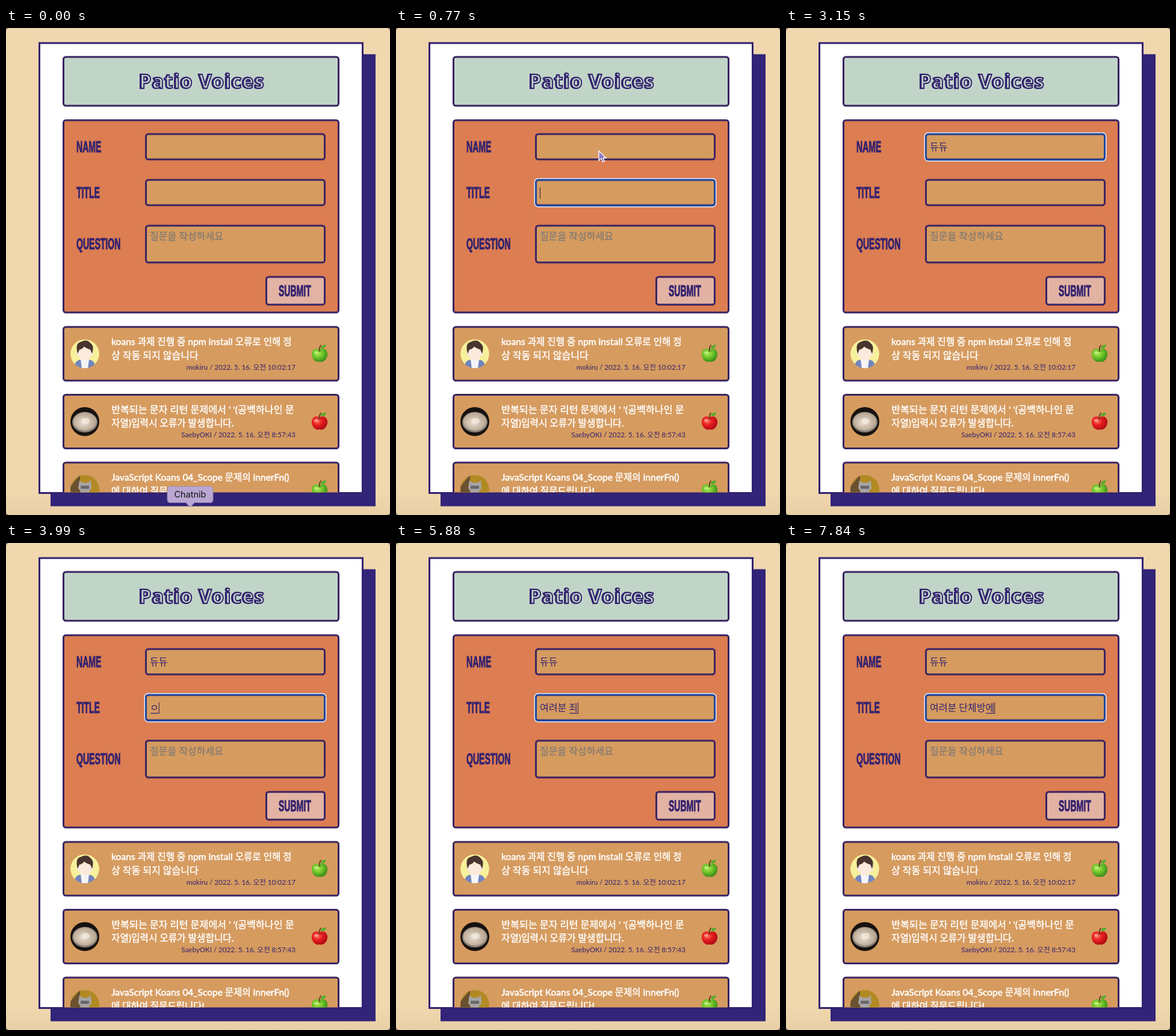
Animation, 638 px wide and 808 px high, one loop 8 s. Source, as an HTML page:

```html
<!DOCTYPE html>
<html lang="ko">
<head>
<meta charset="utf-8">
<title>Question board</title>
<style>
  html, body { margin: 0; height: 100%; overflow: hidden; background: #f0d7ae; }
  svg { display: block; width: 100%; height: 100%; }
  text { font-family: Lato, "Noto Sans CJK KR", "Noto Sans CJK", sans-serif; white-space: pre; fill: #33226f; }
  .box { stroke: #3a2462; stroke-width: 3; }
  .label { font: bold 26px "Liberation Sans", sans-serif; stroke: #33226f; stroke-width: 1; }
  .heading { font: bold 32px "Noto Sans", sans-serif; letter-spacing: 1.4px; text-anchor: middle; }
  .question { font-weight: 500; fill: #fff; stroke: #fff; stroke-width: .45; }
  .author { font-size: 11.6px; text-anchor: end; }
  .typed { font-size: 16px; }
  .placeholder { font-size: 16px; fill: #7e7973; stroke: #7e7973; stroke-width: .25; }
</style>
</head>
<body>
<svg viewBox="0 0 638 808">
  <defs>
    <clipPath id="page"><rect x="57" y="27" width="534" height="744"/></clipPath>
    <clipPath id="disc"><circle r="24"/></clipPath>
    <linearGradient id="edge" x2="0" y2="1">
      <stop stop-color="#9a7c50" stop-opacity="0"/><stop offset="1" stop-color="#9a7c50" stop-opacity=".09"/>
    </linearGradient>
    <radialGradient id="greenSkin" cx=".38" cy=".35" r=".75">
      <stop stop-color="#b4ed55"/><stop offset=".5" stop-color="#66bd26"/><stop offset="1" stop-color="#2c7d14"/>
    </radialGradient>
    <radialGradient id="redSkin" cx=".35" cy=".35" r=".75">
      <stop stop-color="#ff8069"/><stop offset=".4" stop-color="#ea1e20"/><stop offset="1" stop-color="#a30912"/>
    </radialGradient>
    <radialGradient id="soup" cx=".45" cy=".55">
      <stop stop-color="#eee4d8"/><stop offset=".6" stop-color="#cdbdab"/><stop offset="1" stop-color="#b9a894"/>
    </radialGradient>
    <g id="person" clip-path="url(#disc)">
      <circle r="24" fill="#f7f09a"/>
      <path d="M-18 25q1-15 11-15h14q10 0 11 15z" fill="#7385bd"/>
      <path d="M-7 9h14l-2 16h-10z" fill="#f5f5f7"/>
      <circle cx="-11" r="3" fill="#fbe3d3"/><circle cx="11" r="3" fill="#fbe3d3"/>
      <ellipse cy="-1" rx="11" ry="12" fill="#fdeadd"/>
      <path d="M-12 0q-5-18 6-20 10-5 16 3 6 4 2 17l-3-7q-7-2-10-5-4 5-8 5z" fill="#4a3430"/>
    </g>
    <g id="bowl">
      <circle r="24" fill="#17120f"/>
      <ellipse cy="1" rx="21" ry="17" fill="#8b837a"/>
      <ellipse rx="19" ry="15" fill="url(#soup)"/>
      <ellipse cx="1" cy="-1" rx="7" ry="5" fill="#f5ecdf" opacity=".7"/>
    </g>
    <g id="cat" clip-path="url(#disc)">
      <circle r="24" fill="#b28a24"/>
      <path d="M-24-5L-8-24V24h-16z" fill="#6a5130"/>
      <path d="M-9-15l5 4h9l5-4 1 13-4 5 4 20h-22l4-20-4-5z" fill="#a7a5a4"/>
      <path d="M-7-6h14v5h-14zM-10 5h20v4h-20z" fill="#696469"/>
    </g>
    <g id="apple">
      <path d="M0-7C6-11 14-7 13 2 12 10 6 15 0 13-6 15-12 10-13 2-14-7-6-11 0-7z"/>
      <path d="M-5-6q5 3 10 0-5 6-10 0z" fill="#000" opacity=".25"/>
      <path d="M0-5q-1-5 2-9" fill="none" stroke="#6b4222" stroke-width="2" stroke-linecap="round"/>
      <path d="M2-9q1-6 9-6-1 7-9 6z" fill="#4fae28"/>
      <ellipse cx="-6" cy="-2" rx="3" ry="2" fill="#fff" opacity=".35"/>
    </g>
    <path id="beamShape" d="M-3-7q3 0 3 2V5q0 2-3 2M3-7q-3 0-3 2M3 7q-3 0-3-2M-2 1h4"/>
  </defs>

  <rect width="638" height="808" fill="#6b604f"/>
  <rect width="638" height="808" rx="5" fill="#f0d7ae"/>
  <rect y="770" width="638" height="38" rx="5" fill="url(#edge)"/>
  <rect x="74" y="43.500" width="540" height="750" fill="#322478"/>
  <rect x="55.500" y="25" width="537" height="746.500" fill="#fff" stroke="#33226f" stroke-width="3"/>
  <g id="content" transform="translate(0 -.5)" clip-path="url(#page)"></g>

  <g id="ring" fill="none">
    <rect x="230.500" width="301" height="46.500" rx="5.500" stroke="#dcecfa" stroke-width="2"/>
    <rect x="232.500" y="2" width="297" height="42.500" rx="4" stroke="#24479c" stroke-width="3"/>
  </g>
  <text id="name" class="typed" x="239" y="203"></text>
  <text id="title" class="typed" x="239" y="279"></text>
  <path id="underline" stroke="#33226f" stroke-width="1.200"/>
  <path id="caret" stroke="#2a2050"/>

  <g id="tooltip">
    <path d="M273 760.500h66q5 0 5 5v17q0 5-5 5h-26l-7 8-7-8h-26q-5 0-5-5v-17q0-5 5-5z" fill="#b9a6d2" stroke="#988aab" stroke-width=".7"/>
    <text x="306" y="779" text-anchor="middle" style="font:14.500px Inter,sans-serif;fill:#111">Chatnib</text>
  </g>
  <path id="arrow" d="M0 0v16l4-3.500 2.500 6 3-1.300-2.500-5.700h5z" fill="#8a78c4" stroke="#fff" stroke-width="1.300"/>
  <g id="beam" transform="translate(337 201.500)" fill="none" stroke-linecap="round">
    <use href="#beamShape" stroke="#fff" stroke-width="2.800"/>
    <use href="#beamShape" stroke="#8a7468"/>
  </g>
</svg>
<script>
const $ = id => document.getElementById(id);

// Static page
const box = (x, y, w, h, fill) =>
  `<rect class="box" x="${x + 1.5}" y="${y + 1.5}" width="${w - 3}" height="${h - 3}" rx="4" fill="${fill}"/>`;
const input = (y, h) => box(231, y, 300, h, '#d69b5f');
const label = (x, y, text) =>
  `<text class="label" transform="translate(${x} ${y}) scale(.54 1)">${text}</text>`;
const line = (y, size, text) => `<text class="question" x="175" y="${y}" font-size="${size}">${text}</text>`;
const heading = (dx, style) =>
  `<text class="heading" x="${325 + dx}" y="100" style="${style}">Patio Voices</text>`;

const posts = [
  { avatar: 'person', skin: 'greenSkin', author: 'mokiru / 2022. 5. 16. 오전 10:02:17',
    lines: [[15.6, 'koans 과제 진행 중 npm install 오류로 인해 정'], [16, '상 작동 되지 않습니다']] },
  { avatar: 'bowl', skin: 'redSkin', author: 'SaebyOKI / 2022. 5. 16. 오전 8:57:43',
    lines: [[16.2, "반복되는 문자 리턴 문제에서 ' '(공백하나인 문"], [15.7, '자열)입력시 오류가 발생합니다.']] },
  { avatar: 'cat', skin: 'greenSkin', author: '',
    lines: [[15.5, 'JavaScript Koans 04_Scope 문제의 innerFn()'], [15.5, '에 대하여 질문드립니다!']] }
];

const postMarkup = (post, i) => `<g transform="translate(0 ${i * 112.5})">
  ${box(94, 495, 460, 92, '#d69b5f')}
  <use href="#${post.avatar}" x="131" y="541"/>
  ${post.lines.map(([size, text], row) => line(526.5 + row * 22.5, size, text)).join('')}
  <text class="author" x="481" y="567">${post.author}</text>
  <use href="#apple" x="521" y="541" fill="url(#${post.skin})"/></g>`;

$('content').innerHTML =
  box(94, 47, 460, 84, '#c0d5c7') +
  heading(2.5, 'fill:#fff;opacity:.6') +
  heading(-.3, 'stroke:#33226f;stroke-width:2.4') +
  heading(.9, 'fill:#c0d5c7;stroke:#33226f;stroke-width:2') +
  box(94, 152, 460, 322, '#dc7d52') +
  label(117, 206, 'NAME') + label(117, 282, 'TITLE') + label(117, 367, 'QUESTION') +
  input(175, 45) + input(251, 45) + input(327, 64) +
  '<text class="placeholder" x="239" y="351.5">질문을 작성하세요</text>' +
  box(431, 412, 100, 49, '#e2b2a3') + label(453, 445, 'SUBMIT') +
  posts.map(postMarkup).join('');

// Timeline
const LOOP = 8000, STEP = 70;
const nameKeys = [[0, ''], [1890, 'ㄷ'], [1960, '듀'], [2100, '듇'], [2240, '듀ㄷ'], [2310, '듀듀']];
const titleKeys = [
  [0, ''], [3990, 'ㅇ'], [4130, '여'], [4480, '여ㄹ'], [4550, '여려'], [4690, '여렵'],
  [4900, '여려부'], [4970, '여려분'], [5040, '여려분 '], [5530, '여려분 ㅈ'], [5600, '여려분 조'],
  [5880, '여려분 죄'], [5950, '여려분 죄ㄷ'], [6090, '여려분 죄다'], [6370, '여려분 죄ㄷ'],
  [6510, '여려분 죄'], [6650, '여려분 '], [7000, '여려분 ㄷ'], [7070, '여려분 다'], [7210, '여려분 단'],
  [7280, '여려분 단ㅊ'], [7350, '여려분 단체'], [7490, '여려분 단쳅'], [7560, '여려분 단체바'],
  [7630, '여려분 단체방'], [7770, '여려분 단체방ㅇ'], [7840, '여려분 단체방에']
];
const focusKeys = [[0, ''], [420, 'title'], [1260, 'name'], [3570, 'title']];
const pointerPath = [[70, 285, 770], [210, 160, 570], [350, 109, 310], [490, 175, 120], [560, 240, 82], [700, 325, 180], [770, 337, 204]];

const at = (keys, t) => keys.findLast(key => key[0] <= t)[1];

function pointerAt(t) {
  const i = pointerPath.findIndex(point => point[0] > t);
  if (i < 0) return pointerPath.at(-1).slice(1);
  const [t0, x0, y0] = pointerPath[Math.max(i - 1, 0)], [t1, x1, y1] = pointerPath[i];
  const k = Math.max(0, (t - t0) / (t1 - t0));
  return [x0 + (x1 - x0) * k, y0 + (y1 - y0) * k];
}

const show = (id, visible) => { $(id).style.display = visible ? '' : 'none'; };

function draw(t) {
  const focus = at(focusKeys, t);
  const values = { name: at(nameKeys, t), title: at(titleKeys, t) };
  for (const id in values) $(id).textContent = values[id].replaceAll(' ', '\u00a0');

  const top = focus === 'name' ? 174 : 250;
  const value = values[focus] || '';
  const end = 239.5 + (value ? $(focus).getComputedTextLength() : 0);
  const caretOff = (t >= 980 && t < 1260) || (t >= 3150 && t < 3570);
  const composing = value && !value.endsWith(' ') && !(focus === 'name' && t >= 2660);
  $('ring').setAttribute('transform', `translate(0 ${top})`);
  $('caret').setAttribute('d', `M${end} ${top + 14.5}v18.5`);
  $('underline').setAttribute('d', `M${end - 14.5} ${top + 32.5}H${end}`);
  show('ring', focus);
  show('caret', focus && !caretOff);
  show('underline', composing);

  const [x, y] = pointerAt(Math.floor(t / STEP) * STEP);
  $('arrow').setAttribute('transform', `translate(${x} ${y})`);
  show('tooltip', t < 70);
  show('arrow', t >= 70 && t < 910);
  show('beam', t >= 910 && t < 1890);
}

let start;
function tick(now) {
  start ??= now;
  draw((now - start) % LOOP);
  requestAnimationFrame(tick);
}
draw(0);
requestAnimationFrame(tick);
</script>
</body>
</html>
```
